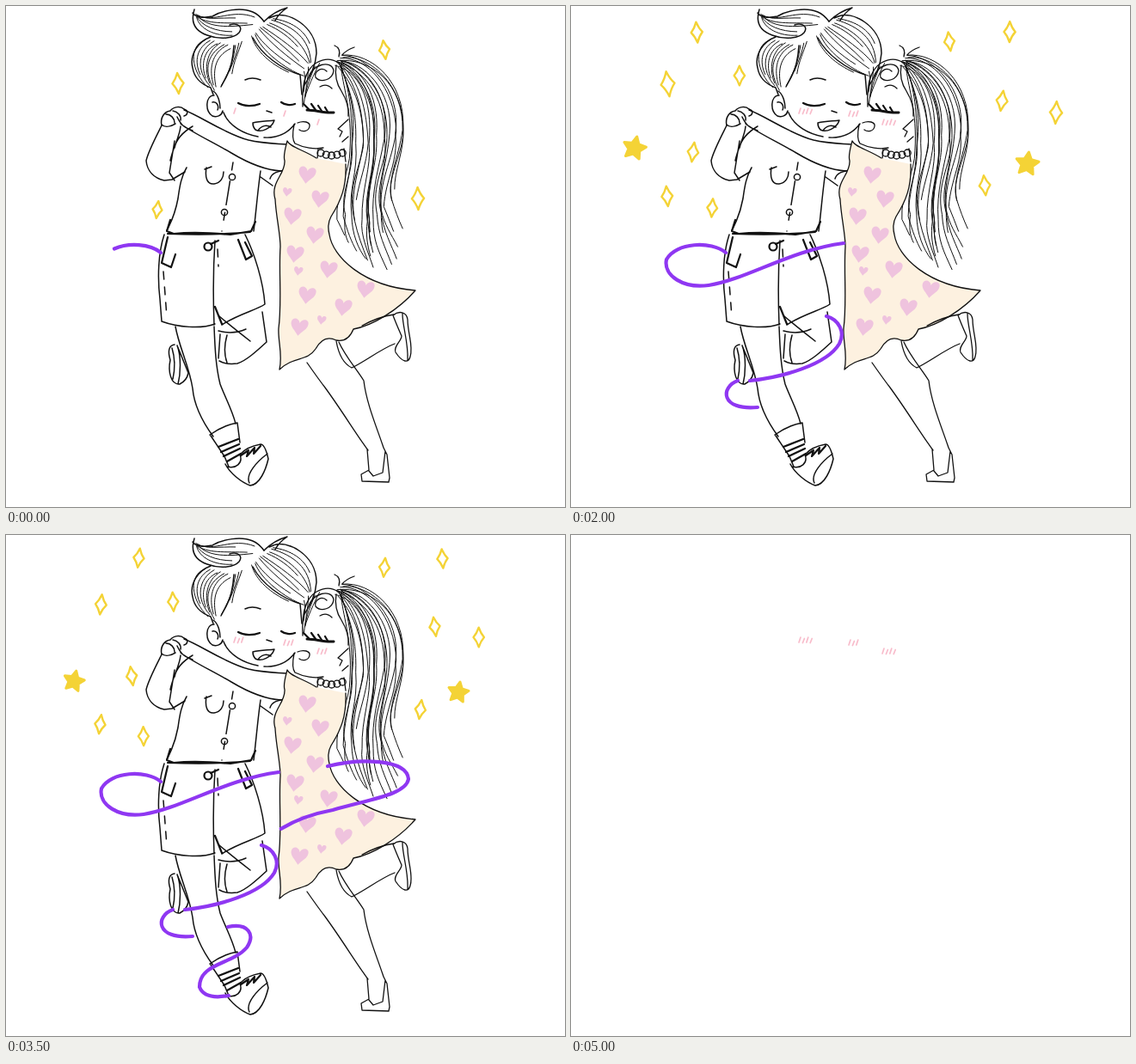
Animation of 650 by 583 pixels, one loop 5.03 s. Source, as an HTML page:

```html
<!DOCTYPE html>
<html lang="en">
<head>
<meta charset="utf-8">
<title>Dancing couple</title>
<style>
html, body { margin: 0; width: 100%; height: 100%; overflow: hidden; background: #fff; }
svg { display: block; width: 650px; height: 583px; }
path, circle { fill: none; stroke-linecap: round; stroke-linejoin: round; }
#figures { stroke: #111; stroke-width: 1.3; }
#boy { stroke-width: 1.5; }
#figures .hair { stroke-width: 1; }
#figures .bold { stroke-width: 2.2; }
#figures .lash { stroke-width: 3; }
#figures .cloth { fill: #fdf1e0; }
.heart path { fill: #efc3de; stroke: none; }
.ribbon { stroke: #8f37f2; stroke-width: 4.2; }
.spark { stroke: #f4d336; stroke-width: 2.4; }
.star { fill: #f4d336; stroke: #f4d336; stroke-width: 3; }
.blush { stroke: #f8bccb; stroke-width: 1.7; }
</style>
</head>
<body>
<svg viewBox="0 0 650 583">
<g id="figures">
  <g id="boy">
    <!-- hair outline -->
    <path d="M217 8C221 14 230 14 240 12C252 5 273 1 287 7C294 10 297 14 300 18M219 4C214 20 220 29 234 34C250 40 266 37 271 31C276 24 269 19 260 22M238 36C224 41 213 56 217 72C219 84 227 91 238 95L241 103M265 46C264 62 262 72 256 83L250 94"/>
    <path d="M300 18C306 12 316 5 327 2C321 6 316 11 313 17M306 14L311 12C325 5 361 22 361 55C360 70 354 81 347 92M287 37C297 56 319 73 342 80L344 103"/>
    <!-- face -->
    <path d="M241 99C247 103 249 113 249 119M242 104C232 104 231 122 240 128C246 130 251 127 252 122M240 112C245 111 248 116 246 121M253 124C259 140 277 149 293 152M300 153C315 154 328 148 336 137M278 86C284 83 291 84 296 86M303 122L309 124"/>
    <path class="bold" d="M270 113C277 117 287 117 295 114M320 112C324 115 331 116 336 114"/>
    <path d="M287 136C296 134 305 134 312 133C309 142 297 148 290 144C288 142 287 139 287 136ZM293 145C297 139 303 138 308 141"/>
    <!-- hands and arms -->
    <path d="M181 139C179 130 184 123 191 122C195 117 203 116 207 120C213 122 211 127 207 128M181 138C185 142 192 140 197 137M186 126C192 126 196 131 196 136M194 122C200 123 204 128 203 133"/>
    <path d="M181 139C174 153 165 170 163 180C164 192 172 200 184 203L193 202M203 140C202 152 194 165 191 180M217 140C207 146 198 154 196 165M196 157L190 194L196 203M193 202L208 193"/>
    <path d="M207 121C226 128 255 149 282 156C299 160 314 160 326 161M203 137C216 147 238 157 262 171C282 183 300 191 320 192M199 129C204 140 209 142 217 145"/>
    <!-- shirt -->
    <path d="M210 188C204 198 202 209 200 224C197 240 192 252 187 261M296 192C293 212 291 237 288 262M296 199L310 209M307 201C309 194 315 193 324 191M233 188C231 200 234 208 242 207C250 206 253 199 253 193M231 190L239 187"/>
    <path class="bold" d="M191 249L187 262L195 265C215 263 240 264 261 266L285 262L290 251M188 265C215 266 245 267 284 263"/>
    <path stroke-dasharray="9 13 28 9" d="M264 182L251 262"/>
    <circle cx="263" cy="199" r="3.6"/><circle cx="254" cy="240" r="3.6"/>
    <!-- shorts -->
    <path d="M184 266C177 287 176 316 179 341L181 367C200 374 227 376 243 370M278 266C289 288 299 320 301 347C291 354 271 358 251 371M243 273C241 303 241 345 242 371"/>
    <path class="bold" d="M188 269L181 299L192 304L197 289M270 272L279 295L286 291L278 275M243 350L251 370M238 277L247 273"/>
    <path stroke-dasharray="9 9" d="M183 309L187 362M246 283L247 303"/>
    <circle class="bold" cx="235" cy="280" r="4.5"/>
    <!-- legs and shoes -->
    <path d="M197 373C201 396 213 419 217 445C219 468 230 486 241 501M242 373C243 399 244 420 249 440C255 456 263 470 267 486M298 356L303 391C291 402 279 413 269 416C261 417 253 416 248 413M248 361C261 372 275 383 284 390M247 378C258 381 270 380 279 376M249 382L247 410M257 383C253 397 254 407 257 415"/>
    <path d="M196 394C189 395 188 402 191 412C188 426 192 441 202 440C208 437 211 432 212 427L199 395C204 408 203 428 200 440M193 398C197 411 196 425 194 434"/>
    <path d="M237 499C247 492 257 487 269 485L272 508M238 500L254 524L259 536"/>
    <path d="M255 533C260 543 273 554 284 558C295 557 302 540 305 527C303 518 300 510 296 510C285 512 277 516 272 522C276 532 267 539 257 536M283 555C278 545 292 530 304 521"/>
    <path class="bold" d="M273 523L282 517L280 524L289 514L288 521L296 512M247 513L270 504M250 519L271 510M253 524L272 515M257 530L273 521"/>
  </g>
  <g id="locks" class="hair"></g>
  <!-- girl: face -->
  <path d="M387 59C389 52 387 48 382 46M391 57C395 52 399 50 405 48M345 117C344 96 346 75 361 66C370 61 379 61 386 66M352 83C356 68 378 62 381 75C380 86 366 90 360 83C358 76 367 70 373 76M384 69C382 81 384 90 390 99C396 109 399 118 398 128M365 94C370 91 375 92 379 96"/>
  <path class="lash" d="M350 121C360 121 370 125 381 124"/>
  <path class="bold" d="M352 120L346 114M360 121L355 114M367 122L363 116M374 123L371 118"/>
  <path d="M339 136C346 133 354 135 353 140C352 146 345 147 341 144M398 132L386 143L391 146L388 152M335 138C333 148 333 156 336 160C346 165 359 167 369 165M398 152L391 158M363 166L362 178M393 166L395 181"/>
  <!-- girl: dress -->
  <path class="cloth" d="M395 184C396 210 390 226 378 245C374 252 374 258 376 266C380 292 415 326 476 331C456 354 426 372 404 376C400 386 394 391 384 389C374 384 366 388 360 399C350 414 335 407 318 423C322 405 316 390 317 375C321 345 317 310 319 280C319 265 314 245 313 225C307 205 325 196 324 180C322 174 325 165 327 157C330 164 345 167 361 177"/>
  <g id="pearls"></g>
  <g id="print" class="heart"></g>
  <!-- girl: legs and shoes -->
  <path d="M350 415C357 425 364 435 371 444C390 470 407 498 421 517M387 391C394 407 408 423 416 436C419 462 431 490 439 514M384 390C387 407 394 417 402 421C417 414 436 399 452 393M414 372C425 366 437 361 451 359M420 516L422 540L413 545L414 553L445 554L446 549L443 522L439 514M422 541L427 547L438 543L441 518"/>
  <path d="M450 360C457 354 466 356 467 365C467 381 474 396 470 408C468 416 461 415 453 403C450 396 460 390 460 384C456 375 453 368 450 360M461 358C461 373 468 391 467 412"/>
</g>
<g id="motion"></g>
</svg>
<script>
const STEP = 500, LOOP = 5030, LAST = 9;
const $ = id => document.getElementById(id);
const mix = (a, b, k) => a + (b - a) * k;
const clamp = k => Math.max(0, Math.min(1, k));
const nums = text => text.split(/[ ,]+/).map(Number);
const range = (n, make) => Array.from({ length: n }, (_, i) => make(i)).join('');

let seed = 7;
const rnd = () => (seed = seed * 16807 % 2147483647) / 2147483647;
const jitter = r => (rnd() * 2 - 1) * r;

// Loose strands between two edge curves
function lock(from, to, count, rough) {
  const a = nums(from), b = nums(to);
  return range(count, i => {
    const pts = a.map((v, j) => mix(v, b[j], i / (count - 1)) + jitter(rough));
    return `<path pathLength="1" stroke-dasharray="${.65 + .4 * rnd()} 1" d="M${pts.slice(0, 2)}C${pts.slice(2)}"/>`;
  });
}
const middle = '387 65 410 75 432 105 430 155 430 190 416 215 420 250 422 275 430 295 438 312';
$('locks').innerHTML =
  lock('233 38 212 48 214 78 238 96', '262 48 240 58 240 80 245 98', 8, 2) +
  lock('266 46 264 62 262 72 250 94', '274 42 270 55 266 62 262 78', 3, 1) +
  lock('220 12 226 32 255 42 282 30', '222 10 240 18 262 3 290 12', 6, 2) +
  lock('286 36 292 56 318 76 344 82', '312 13 338 20 358 35 357 62', 10, 2) +
  lock('346 76 350 90 346 100 346 115', '364 66 356 80 350 92 348 106', 4, 2) +
  lock('386 72 394 92 400 120 398 165 398 195 385 215 388 245 390 262 396 275 405 290', middle, 10, 4) +
  lock(middle, '388 59 424 54 468 92 465 145 464 175 449 200 452 225 455 245 462 258 471 271', 11, 4);

$('pearls').innerHTML = range(5, i =>
  `<circle cx="${366 + 6.3 * i}" cy="${171 + 3 * Math.sin(i * Math.PI / 4)}" r="4"/>`);

const heart = (x, y, r, turn = 9) =>
  `<path transform="translate(${x} ${y}) rotate(${turn}) scale(${r})" d="M0 1.1C-.4 .5-1.05 .2-1-.4C-.95-1-.2-1.05 0-.4C.2-1.05 1.05-1 1-.4C1 .2 .4 .5 0 1.1Z"/>`;
const hearts = (places, r) => places.split(' ').map(p => heart(...nums(p), r)).join('');
$('print').innerHTML =
  hearts('350,196 365,224 333,244 359,266 336,288 375,306 350,336 418,329 392,350 341,373', 10) +
  hearts('327,216 340,308 367,365', 5.2);

// Each ribbon piece grows evenly: path, first step, number of steps
const ribbons = [
  ['M180 287C163 273 122 275 111 295C107 314 131 329 160 325C205 318 255 284 317 276', -.9, 4.9],
  ['M297 361C312 365 319 380 312 393C297 418 245 432 208 436', 0, 2.1],
  ['M194 436C174 443 173 471 217 467', 2, 1],
  ['M258 456C282 451 290 465 280 480C263 500 225 498 225 526C230 539 248 538 259 536', 4.3, 2.4],
  ['M305 531C322 527 333 542 323 551C314 554 311 545 318 543', 7, 1],
  ['M374 269C410 260 466 260 468 284C465 302 425 307 380 320C342 327 298 348 298 367C302 384 318 389 317 374C312 367 307 366 300 366', 4, 4],
  ['M420 410C445 408 443 435 425 446C402 458 373 470 374 493C378 508 396 503 391 496L387 496', 8, 1]
];
function ribbon([d, first, steps], n) {
  const share = clamp((n - first) / steps);
  return share && `<path class="ribbon" pathLength="1" stroke-dasharray="${share} 2" d="${d}"/>`;
}

// Drifting shapes: first step, from, to, starting radius
const sparks = [
  '2 137,35 156,26 14', '2 115,102 110,79 19', '0 200,90 194,77 13', '1 134,181 147,163 13',
  '0 176,237 159,234 11', '3 113,222 109,220 13', '0 440,51 440,37 12', '2 513,33 507,27 14',
  '1 506,117 498,106 14', '4 564,124 547,118 14', '0 479,224 482,202 14'
].map(nums);
const stars = ['3 71,163 80,171 14.5', '3 533,184 525,183 14.5'].map(nums);

function drift([first, x0, y0, x1, y1, r], n) {
  const k = 1 - (1 - clamp((n - first) / (LAST - first))) ** 2;
  return [mix(x0, x1, k), mix(y0, y1, k), mix(r, 12, k)];
}
function sparkle(s, i, n) {
  const [x, y, r] = drift(s, n), h = r - 1, w = h * .55, a = w * .38, b = h * .38;
  return `<path class="spark" transform="translate(${x} ${y}) rotate(${8 * Math.sin(i * 5 + n * 3)})" d="M0 ${-h}Q${a} ${-b} ${w} 0Q${a} ${b} 0 ${h}Q${-a} ${b} ${-w} 0Q${-a} ${-b} 0 ${-h}Z"/>`;
}
function star(s, i, n) {
  const [x, y, r] = drift(s, n);
  const pts = range(10, p => {
    const t = p * Math.PI / 5 - 1.5 + .15 * Math.sin(n * 2 + i), q = p % 2 ? r * .5 : r;
    return `${x + q * Math.cos(t)} ${y + q * Math.sin(t)} `;
  });
  return `<path class="star" d="M${pts}Z"/>`;
}
const born = (list, shape, n) => list.map((s, i) => n < s[0] ? '' : shape(s, i, n)).join('');

// Blush refills stroke by stroke every five steps
const cheek = (x, y, most, n) => range(Math.min(most, 1 + n % 5), i =>
  `<path class="blush" d="M${x + 4.4 * i} ${y + i % 2 * 1.5}l-2 ${6 - i % 2}"/>`);

function draw(n) {
  const end = n > LAST, pose = Math.min(n, LAST);
  $('figures').style.display = end ? 'none' : '';
  let out = cheek(267, 119, 4, pose) + cheek(325, 122, 3, pose) + cheek(364, 132, 4, pose);
  if (!end) {
    out += ribbons.map(r => ribbon(r, n) || '').join('') + born(sparks, sparkle, n) + born(stars, star, n);
    if (n > 7) out += `<g class="heart">${heart(mix(375, 378, n - 8), mix(27, 23, n - 8), mix(13, 19, n - 8), 17)}</g>`;
  }
  $('motion').innerHTML = out;
}

let shown = -1;
const start = performance.now();
function tick() {
  const n = Math.floor((performance.now() - start) % LOOP / STEP);
  if (n !== shown) draw(shown = n);
  requestAnimationFrame(tick);
}
tick();
</script>
</body>
</html>
```
